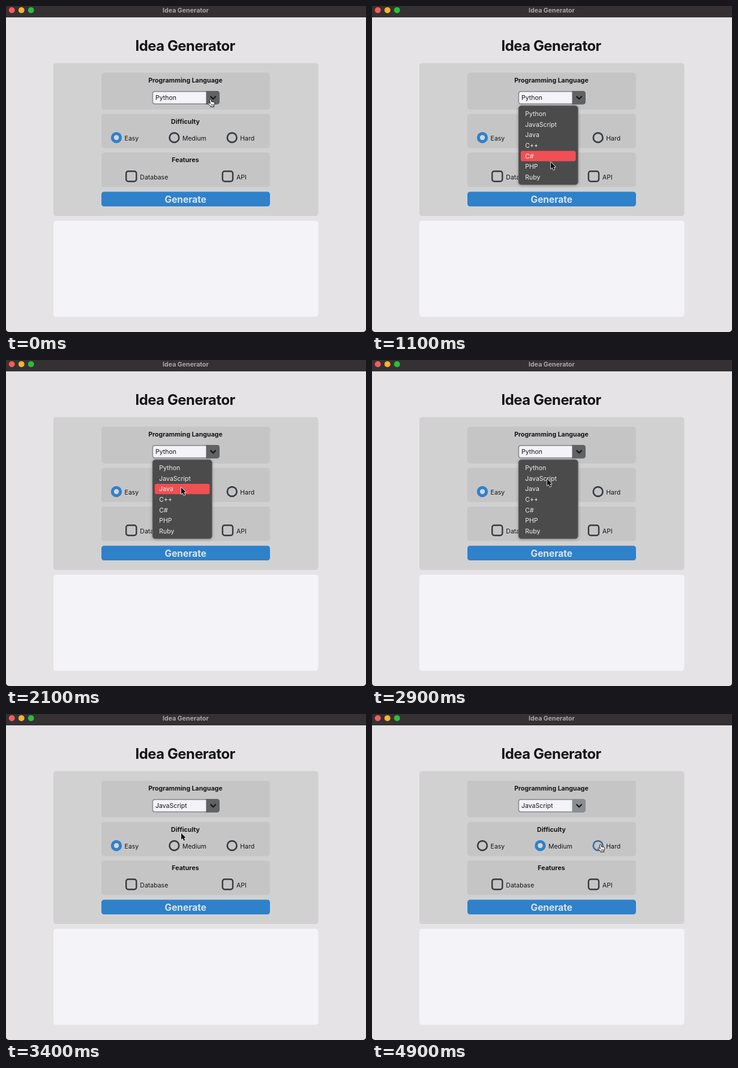
Write an HTML page with a canvas that moves like this. It is 600 px wide and 545 px high and loops after 5 s.

```html
<!DOCTYPE html>
<html lang="en">
<head>
<meta charset="utf-8">
<title>Idea Generator</title>
<style>
  html, body { margin: 0; width: 100%; height: 100%; overflow: hidden; background: #e5e3e5; }
  canvas { display: block; }
</style>
</head>
<body>
<canvas id="stage" width="600" height="545"></canvas>
<script>
const ctx = document.getElementById('stage').getContext('2d');
const LOOP = 5000, STEP = 100;
const INK = '#141416', DARK = '#363b40', BLUE = '#2f81ca', HOVER = '#366f9f', CARD = '#c6c5c6';
const LANGS = ['Python', 'JavaScript', 'Java', 'C++', 'C#', 'PHP', 'Ruby'];
const ROW = 17.65, MENU_TOP = 171.5;

// time, x, y of the pointer's hot spot
const PATH = [
  [0, 340, 156], [100, 340, 154], [600, 340, 154], [800, 322, 194], [1000, 301, 250],
  [1100, 298, 261], [1200, 298, 263], [1500, 298, 280], [1800, 297, 285],
  [1900, 295, 255], [2000, 293, 223], [2100, 292, 213], [2300, 292, 203],
  [2500, 292, 199], [3400, 292, 199], [3700, 288, 212], [4000, 284, 217],
  [4300, 284, 217], [4600, 330, 217], [4900, 380, 218], [5000, 380, 218]
];

function pointerAt(t) {
  let i = 1;
  while (i < PATH.length - 1 && PATH[i][0] < t) i++;
  const [t0, x0, y0] = PATH[i - 1], [t1, x1, y1] = PATH[i];
  const k = Math.max(0, (t - t0) / (t1 - t0));
  return { x: x0 + (x1 - x0) * k, y: y0 + (y1 - y0) * k };
}

function box(x, y, w, h, r, fill) {
  ctx.beginPath();
  ctx.roundRect(x, y, w, h, r);
  ctx.fillStyle = fill;
  ctx.fill();
}

function frame(x, y, w, h, r, color, width) {
  ctx.beginPath();
  ctx.roundRect(x + width / 2, y + width / 2, w - width, h - width, r);
  ctx.strokeStyle = color;
  ctx.lineWidth = width;
  ctx.stroke();
}

function disc(x, y, r, fill) {
  ctx.beginPath();
  ctx.arc(x, y, r, 0, Math.PI * 2);
  ctx.fillStyle = fill;
  ctx.fill();
}

function text(s, x, y, size, weight = 400, color = INK, align = 'left', spacing = 0) {
  ctx.font = `${weight} ${size}px Inter, sans-serif`;
  ctx.letterSpacing = spacing + 'px';
  ctx.textAlign = align;
  ctx.fillStyle = color;
  ctx.fillText(s, x, y);
}

const heading = (s, y) => text(s, 299, y, 10.6, 700, INK, 'center');

function radio(x, label, on, hover) {
  disc(x, 220, 9.2, on ? BLUE : hover ? HOVER : DARK);
  disc(x, 220, on ? 4.2 : 6.6, on ? '#d3d5d9' : CARD);
  text(label, x + 13.6, 224.8, 10.5);
}

function checkbox(x, label) {
  frame(x, 275, 19.5, 19.5, 3.5, DARK, 2.4);
  text(label, x + 24.3, 289.8, 10.5);
}

function combo(value, hover) {
  const edge = hover ? '#606264' : '#8a8e92';
  box(243.5, 142, 112.5, 22.5, 4.5, '#8d9093');
  box(333, 142, 23, 22.5, [0, 4.5, 4.5, 0], edge);
  box(245.2, 143.8, 88.3, 18.9, [3, 0, 0, 3], '#f4f3f7');
  text(value, 249, 157.3, 10.5);
  ctx.beginPath();
  ctx.moveTo(341.2, 151.5);
  ctx.lineTo(345.2, 155.4);
  ctx.lineTo(349.2, 151.5);
  ctx.strokeStyle = '#17191b';
  ctx.lineWidth = 2.2;
  ctx.lineCap = ctx.lineJoin = 'round';
  ctx.stroke();
}

function menu(row, alpha) {
  ctx.save();
  ctx.globalAlpha = alpha;
  ctx.shadowColor = 'rgba(0,0,0,.3)';
  ctx.shadowBlur = 5;
  ctx.shadowOffsetY = 1;
  box(244, 166.5, 99.5, 132.5, 5, '#4c4b4c');
  ctx.shadowColor = 'transparent';
  frame(244, 166.5, 99.5, 132.5, 4.5, '#676667', 0.8);
  if (row >= 0 && row < LANGS.length) {
    box(248, MENU_TOP + row * ROW + 0.2, 91.5, ROW - 0.4, 3, '#f05053');
  }
  LANGS.forEach((s, i) => text(s, 255.3, 184 + i * ROW, 10.5, 400, '#f0eff0'));
  ctx.restore();
}

const ARROW = new Path2D('M0 0V11L2.5 8.7L4.4 13L6.4 12.1L4.5 8H7.8Z');
const HAND = new Path2D('M-.8 1.4C-1 -.5 1.5 -.7 1.8 1.2L2.4 4.2C3.2 3.5 4.2 3.7 4.5 4.5' +
  'C5.2 3.9 6.1 4.2 6.4 5C7.2 4.7 7.8 5.2 7.8 6.2C7.9 8.4 7.4 9.6 6.6 10.7V12.6H.9V11.5' +
  'C-.8 10.2 -1.8 8.4 -3.1 7.2C-3.8 6.2 -2.5 5.2 -1.4 6L.1 7.1Z');
const FINGERS = new Path2D('M2.2 8.2V10.7M3.9 8.2V10.7M5.5 8.2V10.7');

function pointer({ x, y }, hand) {
  ctx.save();
  ctx.translate(x, y);
  ctx.lineJoin = 'round';
  if (hand) {
    ctx.fillStyle = '#fff';
    ctx.strokeStyle = '#111';
    ctx.lineWidth = 1;
    ctx.fill(HAND);
    ctx.stroke(HAND);
    ctx.lineWidth = 0.7;
    ctx.stroke(FINGERS);
  } else {
    ctx.strokeStyle = '#f2f2f2';
    ctx.lineWidth = 1.6;
    ctx.stroke(ARROW);
    ctx.fillStyle = '#0b0b0b';
    ctx.fill(ARROW);
  }
  ctx.restore();
}

function windowFrame() {
  ctx.fillStyle = '#0c0b0c';
  ctx.fillRect(0, 0, 600, 545);
  box(0, 0, 600, 545, [0, 0, 5, 5], '#e5e3e5');
  ctx.fillStyle = '#353133';
  ctx.fillRect(0, 0, 600, 19);
  ['#fc5b57', '#fdb32a', '#27c03c'].forEach((c, i) => disc(9.7 + i * 16, 7, 5, c));
  text('Idea Generator', 299.5, 10.6, 10.6, 700, '#aaa6a8', 'center');
  text('Idea Generator', 298.7, 75, 23.8, 700, INK, 'center', -0.45);
  box(79, 95.5, 441.5, 255.5, 4.5, '#d2d1d2');
  box(159, 111.5, 281, 61.5, 4.5, CARD);
  box(159, 180.5, 281, 57, 4.5, CARD);
  box(159, 245, 281, 57.5, 4.5, CARD);
  box(159, 310.5, 281, 24.5, 4.5, BLUE);
  box(79, 359, 441.5, 160.5, 4.5, '#f4f3f7');
}

function draw(t) {
  const p = pointerAt(t);
  const medium = t >= 3900;
  const inRadio = (x, w) => t >= 3500 && p.y > 210 && p.x > x && p.x < x + w;
  const onMedium = inRadio(271, 62), onHard = inRadio(367, 48);

  windowFrame();
  heading('Programming Language', 127.8);
  heading('Difficulty', 196.8);
  heading('Features', 261.2);
  combo(t >= 3200 ? 'JavaScript' : 'Python', t < 3500);
  radio(184, 'Easy', !medium, false);
  radio(280.4, 'Medium', medium, onMedium);
  radio(376.7, 'Hard', false, onHard);
  checkbox(199, 'Database');
  checkbox(359.7, 'API');
  text('Generate', 299.3, 329, 15.5, 700, '#dce4ee', 'center');

  if (t >= 100 && t < 3300) {
    // the highlight trails the pointer by one step and blinks on the click
    const row = t < 700 || t === 2900 ? -1 : Math.floor((pointerAt(t - STEP).y - MENU_TOP) / ROW);
    menu(row, t < 3100 ? 1 : t < 3200 ? 0.68 : 0.3);
  }
  pointer(p, t < 100 || onMedium || onHard);
}

const start = performance.now();
function tick(now) {
  const t = Math.max(0, now - start) % LOOP;
  draw(Math.floor(t / STEP) * STEP);
  requestAnimationFrame(tick);
}
draw(0);
requestAnimationFrame(tick);
</script>
</body>
</html>
```
